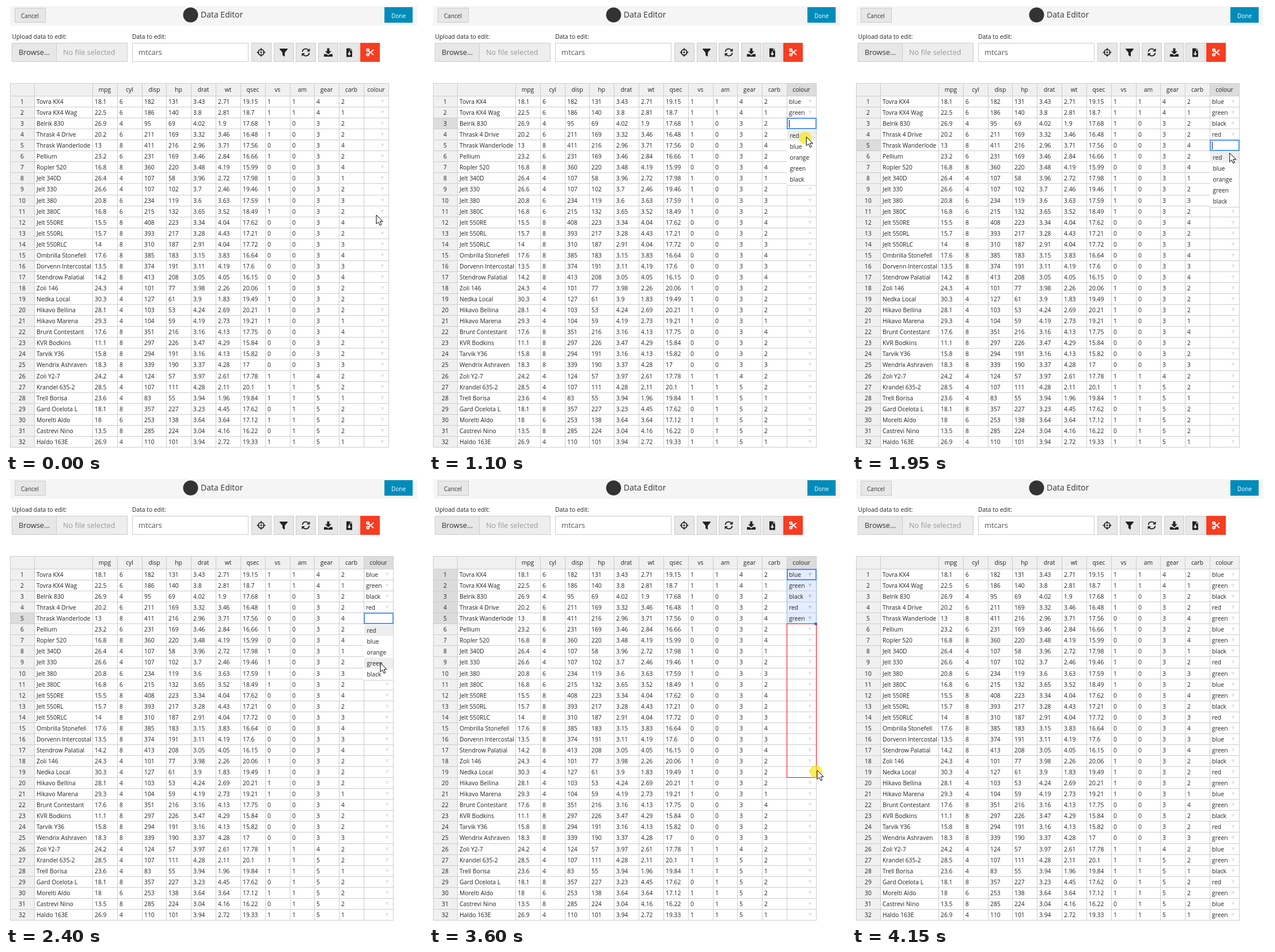
These frames come from a looping animation (724 px wide and 773 px high, 4.25 s). An HTML page with a canvas:

```html
<!DOCTYPE html>
<html lang="en">
<head>
<meta charset="utf-8">
<title>Data Editor</title>
<style>
html, body { margin: 0; width: 100%; height: 100%; overflow: hidden; background: #fff; }
canvas { display: block; }
</style>
</head>
<body>
<canvas id="stage" width="724" height="773"></canvas>
<script>
const ctx = document.getElementById('stage').getContext('2d');
const LOOP = 4250, STEP = 50;
const TOP = 156, ROW = 19.06, COLOUR_X = 621;
const BLUE = '#4b89ff', GRID = '#ccc', HEAD = '#f0f0f0', ACTIVE = '#dcdcdc';

const heads = 'mpg cyl disp hp drat wt qsec vs am gear carb'.split(' ');
const cylinders = '66468684466888888444488884448684';
const names = `Tovra KX4, Tovra KX4 Wag, Belrik 830, Thrask 4 Drive, Thrask Wanderlode,
Pellium, Ropler 520, Jelt 340D, Jelt 330, Jelt 380, Jelt 380C, Jelt 550RE, Jelt 550RL,
Jelt 550RLC, Ombrilla Stonefell, Dorvenn Intercostal, Stendrow Palatial, Zoli 146,
Nedka Local, Hikavo Bellina, Hikavo Marena, Brunt Contestant, KVR Bodkins, Tarvik Y36,
Wendrix Ashraven, Zoli Y2-7, Krandel 635-2, Trell Borisa, Gard Ocelota L, Morelti Aldo,
Castrevi Nino, Haldo 163E`.split(/,\s+/);

// Plausible figures that follow the cylinder count, with seeded scatter
function carRow(name, i) {
  const cyl = +cylinders[i];
  const noise = k => {
    const n = Math.sin(i * 12.9898 + k * 78.233) * 43758.5453;
    return n - Math.floor(n);
  };
  const around = (mid, spread, digits, k) => +(mid + spread * (2 * noise(k) - 1)).toFixed(digits);
  const manual = +(Math.abs(i - 13) > 11);
  return [
    name,
    around(38 - 2.9 * cyl, 4, 1, 1),
    cyl,
    around(62 * cyl - 145, 10 * cyl - 12, 0, 2),
    around(32 * cyl - 47, 30, 0, 3),
    around(4.8 - 0.2 * cyl, 0.3, 2, 4),
    around(0.43 * cyl + 0.57, 0.5, 2, 5),
    around(21.3 - 0.58 * cyl, 1.4, 2, 6),
    +(cyl < 8),
    manual,
    3 + manual + (i > 25),
    Math.ceil(cyl / 2 * (0.25 + 0.75 * noise(7)))
  ];
}
const rows = names.map(carRow);

const options = ['red', 'blue', 'orange', 'green', 'black'];
const picks = [
  { open: 300, done: 450, value: 'blue' },
  { open: 600, done: 950, value: 'green' },
  { open: 1050, done: 1350, value: 'black' },
  { open: 1550, done: 1700, value: 'red' },
  { open: 1850, done: 2500, value: 'green' }
];
const SELECT = 2900, FILL = 3350, RELEASE = 3900, FILLED = 4050, CLEAR = 4100;

const rowY = i => Math.round(TOP + ROW * i);
const rowAt = y => Math.max(0, Math.min(31, Math.floor((y - TOP) / ROW)));
const colX = i => i < 1 ? 49 : Math.round(150 + (i - 1) * 42.82);
const listY = row => rowY(row) + 21.5;

// Pointer path: time, x, y
const path = [
  [0, 643, 363],
  ...picks.flatMap(({ open, done, value }, row) => {
    const y = listY(row) + options.indexOf(value) * 19 + 9;
    return [[open, 657, rowY(row) + 9], [done - 100, 650, y], [done, 650, y]];
  }),
  [2800, 645, 264], [SELECT, 643, 164], [3050, 645, 236], [3300, 673, 253],
  [FILL, 674, 264], [3850, 674, 748], [4000, 664, 763], [CLEAR, 690, 762], [4150, 700, 800]
];

function text(s, x, y, { size = 10.3, color = '#222', align = 'left' } = {}) {
  ctx.font = `${size}px "Open Sans", sans-serif`;
  ctx.fillStyle = color;
  ctx.textAlign = align;
  ctx.fillText(s, x, y);
}
function box(x, y, w, h, fill, border) {
  ctx.fillStyle = fill;
  ctx.fillRect(x, y, w, h);
  if (border) frame(x, y, w, h, border);
}
function frame(x, y, w, h, color, width = 1) {
  ctx.strokeStyle = color;
  ctx.lineWidth = width;
  ctx.strokeRect(x + width / 2, y + width / 2, w - width, h - width);
}
function shape(d, color, x, y, width = 0) {
  const p = new Path2D(d);
  ctx.save();
  ctx.translate(x, y);
  ctx.fillStyle = ctx.strokeStyle = color;
  ctx.lineWidth = width;
  width ? ctx.stroke(p) : ctx.fill(p);
  ctx.restore();
}
function disc(x, y, r, color) {
  ctx.fillStyle = color;
  ctx.beginPath();
  ctx.arc(x, y, r, 0, 7);
  ctx.fill();
}

function drawToolbar() {
  box(7, 0, 707, 34, '#f5f5f5');
  box(15, 3, 54, 26, '#e7e7e7', '#cbcbcb');
  text('Cancel', 41.5, 21, { size: 10, color: '#333', align: 'center' });
  disc(320.5, 15.5, 13, '#333');
  text('Data Editor', 338, 20, { size: 14, color: '#333' });
  box(657, 2, 49, 27, '#008cba');
  text('Done', 681.5, 21, { size: 10, color: '#fff', align: 'center' });

  text('Upload data to edit:', 10.5, 57);
  text('Data to edit:', 219, 57);
  box(10, 64, 201, 33, '#eee', GRID);
  box(10, 64, 78, 33, '#e7e7e7', GRID);
  text('Browse...', 22, 85, { size: 12.8, color: '#333' });
  text('No file selected', 99, 85, { size: 12.7, color: '#999' });
  box(219, 64, 202, 33, '#fff', GRID);
  text('mtcars', 230, 85, { size: 12.8, color: '#555' });

  const ink = '#222', icons = [443, 482, 520.5, 559.5, 596];
  for (const x of icons) box(Math.round(x - 17.5), 64, 35, 33, '#e7e7e7', '#cbcbcb');
  box(615, 64, 34, 33, '#f63d21');

  const [aim, funnel, reload, save, file] = icons;
  shape('M5 0A5 5 0 1 1 -5 0A5 5 0 1 1 5 0M0 -7.5V-3M0 3V7.5M-7.5 0H-3M3 0H7.5', ink, aim, 80.5, 1.7);
  disc(aim, 80.5, 1.5, ink);
  shape('M-7 -7H7V-6L2 0V7L-2 4.5V0L-7 -6Z', ink, funnel, 81);
  shape('M-6 -1A6 6 0 0 1 4.5 -4M6 1A6 6 0 0 1 -4.5 4', ink, reload, 80.5, 1.9);
  shape('M7 -7V-1.5H1.5ZM-7 7V1.5H-1.5Z', ink, reload, 80.5);
  shape('M-2 -7.5H2V-2.5H5.5L0 3L-5.5 -2.5H-2ZM-7.5 2.5H-3L0 5L3 2.5H7.5V7H-7.5Z', ink, save, 81);
  shape('M-5 -7.5H1.5V-3.5H5V7.5H-5ZM2.5 -7.5L5 -4.5H2.5Z', ink, file, 81);
  shape('M-1 -2H1V1.5H3.5L0 5L-3.5 1.5H-1Z', '#e7e7e7', file, 81);
  for (const side of [-1, 1]) {
    const y = 80.5 + 4 * side;
    shape('M2 0A2 2 0 1 1 -2 0A2 2 0 1 1 2 0', '#fff', 628.2, y, 2);
    shape(`M1.4 ${-1.2 * side}L9.8 ${-8.5 * side}`, '#fff', 628.2, y, 2);
  }
}

function drawTable(t, right, first, last) {
  const bottom = rowY(32), selected = i => i >= first && i <= last;
  const area = t >= SELECT;
  box(7, 134, right - 7, 22, HEAD);
  box(7, TOP, 42, bottom - TOP, HEAD);
  if (last >= 0) {
    const y = rowY(first), h = rowY(last + 1) - y;
    box(COLOUR_X, 134, right - COLOUR_X, 22, ACTIVE);
    box(7, y, 42, h, ACTIVE);
    if (area) box(COLOUR_X, y, right - COLOUR_X, h, '#e4edff');
  }

  for (let i = 0; i <= 32; i++) box(7, rowY(i), right - 6, 1, GRID);
  for (let c = 0; c <= 12; c++) box(colX(c), 134, 1, bottom - 134, GRID);
  frame(7, 134, right - 6, bottom - 133, GRID);

  heads.forEach((h, i) => text(h, colX(i + 1) + 21.5, 149, { align: 'center' }));
  text('colour', (COLOUR_X + right) / 2, 149, { align: 'center' });

  rows.forEach((r, i) => {
    const y = rowY(i) + 14;
    text(i + 1, 28, y, { align: 'center' });
    r.forEach((v, c) => text(v, colX(c) + 4, y));
    const pick = picks[i % 5];
    if (i < 5 ? t >= pick.done : t >= FILLED) text(pick.value, 625, y);
    shape('M-3 -3H3L0 3Z', area && selected(i) ? '#b9c6de' : '#e4e4e4', right - 10.5, y - 4);
  });
}

function drawSelection(t, right, first, last, y) {
  const w = right - COLOUR_X + 1, top = rowY(first), end = rowY(last + 1);
  if (t >= SELECT) frame(COLOUR_X, top, w, end - top + 1, '#89aff9');
  frame(COLOUR_X, top, w, rowY(first + 1) - top + 1, BLUE, 2);
  box(right - 4, end - 3, 7, 7, '#fff');
  box(right - 3, end - 2, 5, 5, BLUE);
  if (t >= FILL && t < RELEASE) {
    const start = rowY(5);
    frame(COLOUR_X, start, w, rowY(Math.max(5, rowAt(y)) + 1) - start + 1, '#f00');
  }
}

function drawEditor(t, right, row, y) {
  const w = right - COLOUR_X, top = rowY(row);
  box(COLOUR_X, top, w + 1, 20, '#fff');
  frame(COLOUR_X, top, w + 1, 20, '#5292f7', 2);
  if ((t - picks[row].open) % 1000 < 500) box(625, top + 4, 1, 13, '#000');
  box(COLOUR_X, top + 20, w, 98, '#fff');
  box(COLOUR_X, top + 117, w, 1, GRID);
  const hover = Math.floor((y - listY(row)) / 19);
  options.forEach((o, i) => {
    const lineY = listY(row) + i * 19;
    if (i === 0 || i === hover) box(COLOUR_X + 1, lineY, w - 1, 19, '#eee');
    text(o === 'orange' && w < 50 ? 'oran…' : o, 626.5, lineY + 13);
  });
}

function drawPointer(t, x, y) {
  const pressed = t >= SELECT && t < 3100 || t >= FILL && t < RELEASE ||
    picks.some(p => [p.open, p.done].some(c => t >= c && t < c + 100));
  if (pressed) disc(x - 2, y + 2, 11, 'rgba(245,230,30,.7)');
  const arrow = 'M0 0V15.5L3.6 12.2L6.2 18L8.8 16.8L6.2 11.2H11Z';
  shape(arrow, '#fff', x, y);
  shape(arrow, '#000', x, y, 1);
}

function pointerAt(t) {
  const i = path.findIndex(p => p[0] > t);
  if (i < 0) return path[path.length - 1].slice(1);
  const [a, b] = [path[i - 1], path[i]], k = (t - a[0]) / (b[0] - a[0]);
  return [a[1] + (b[1] - a[1]) * k, a[2] + (b[2] - a[2]) * k];
}

function selectionAt(t, y) {
  if (t >= CLEAR) return [-1, -1];
  if (t >= RELEASE) return [0, 31];
  if (t >= SELECT) return [0, Math.min(4, rowAt(y))];
  const row = picks.filter(p => t >= p.open).length - 1;
  return [row, row];
}

function draw(now) {
  const t = Math.min(4150, Math.floor(now % LOOP / STEP) * STEP);
  const [x, y] = pointerAt(t);
  const right = t < picks[1].done ? 664 : 672;
  const [first, last] = selectionAt(t, y);
  const editing = picks.findIndex(p => t >= p.open && t < p.done);
  box(0, 0, 724, 773, '#fff');
  drawToolbar();
  drawTable(t, right, first, last);
  if (editing >= 0) drawEditor(t, right, editing, y);
  else if (last >= 0) drawSelection(t, right, first, last, y);
  drawPointer(t, x, y);
}

let start;
function tick(now) {
  start ??= now;
  draw(now - start);
  requestAnimationFrame(tick);
}
draw(0);
requestAnimationFrame(tick);
</script>
</body>
</html>
```
